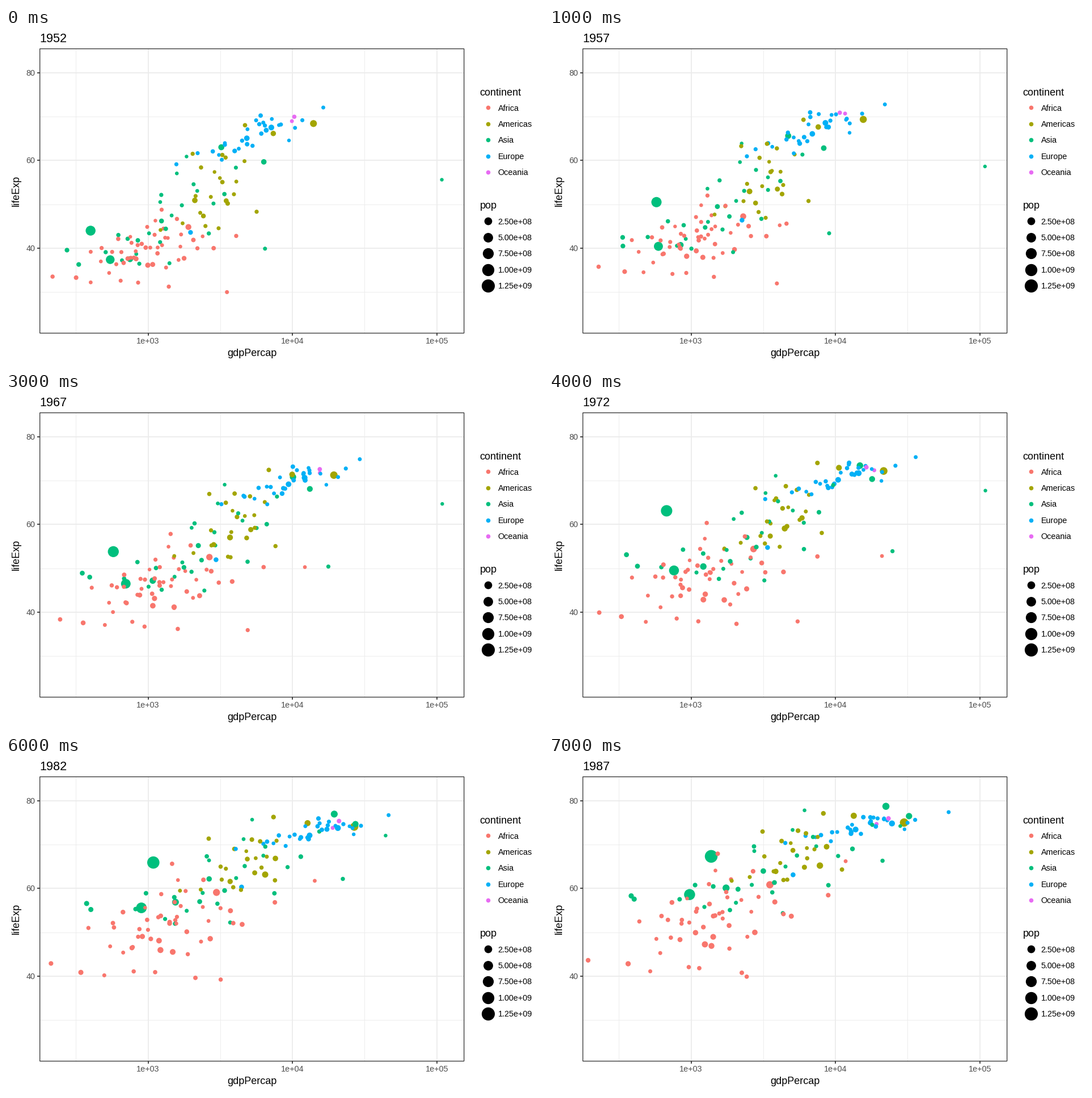
Recreate the animation shown at these times as a matplotlib script. Size 947 by 592 pixels, loop 8 s.

```python
import numpy as np
import matplotlib.pyplot as plt
from matplotlib.animation import FuncAnimation
from matplotlib.patches import Rectangle

W, H, DPI = 947, 592, 100
PX = 72 / DPI
STEPS = 8
INK, GREY, GRID = "#333333", "#4D4D4D", "#EBEBEB"
LEFT, TOP, RIGHT, BOTTOM = 59.7, 36.6, 807.7, 537.6

COLORS = {"Africa": "#F8766D", "Americas": "#A3A500", "Asia": "#00BF7D",
          "Europe": "#00B0F6", "Oceania": "#E76BF3"}

# Per continent: dots, correlation, yearly population growth, then from/to
# pairs of mean log income, its spread, mean life expectancy, its spread
CLOUDS = {
    "Africa": (49, .45, .026, (2.98, 3.13), (.25, .32), (39.5, 53), (4, 6.3)),
    "Americas": (22, .6, .021, (3.48, 3.7), (.18, .2), (54, 68), (7.5, 5)),
    "Asia": (26, .7, .021, (3.12, 3.57), (.3, .44), (47, 64.5), (7.5, 7)),
    "Europe": (28, .85, .006, (3.72, 4.19), (.22, .24), (65.5, 74), (3.7, 2)),
    "Oceania": (2, .9, .018, (4.01, 4.31), (.02, .05), (69.2, 75.3), (.2, 1)),
}

# The dots that stand out: continent, population in millions,
# and key points (step, income, life expectancy)
LEADERS = [
    ("Asia", 556, [(0, 400, 44), (1, 576, 50.5), (2, 488, 44.5),
                   (4, 677, 63.1), (7, 1379, 67.3)]),
    ("Asia", 372, [(0, 547, 37.4), (7, 977, 58.6)]),
    ("Asia", 86, [(0, 3217, 63), (4, 14779, 73.4), (7, 22376, 78.7)]),
    ("Asia", 82, [(0, 750, 37.5), (7, 1748, 60.1)]),
    ("Asia", .3, [(0, 108382, 55.6), (4, 109348, 67.7), (7, 28118, 74.2)]),
    ("Asia", 4, [(0, 6460, 39.9), (4, 24837, 53.9), (7, 21198, 66.3)]),
    ("Asia", 20, [(0, 331, 36.3), (4, 357, 53.1), (7, 385, 58.3)]),
    ("Americas", 158, [(0, 13990, 68.4), (7, 29884, 75)]),
    ("Americas", 57, [(0, 2109, 50.9), (7, 7807, 65.2)]),
    ("Americas", 30, [(0, 3478, 50.8), (7, 8688, 69.5)]),
    ("Europe", 69, [(0, 7144, 67.5), (7, 24639, 74.8)]),
    ("Europe", 22, [(0, 1969, 43.6), (7, 5089, 63.1)]),
    ("Africa", 33, [(0, 1077, 36.3), (4, 1698, 42.8), (7, 1385, 46.9)]),
    ("Africa", 4, [(0, 3521, 30), (4, 5473, 37.9), (7, 2430, 39.9)]),
    ("Africa", 1, [(0, 2388, 42.7), (4, 21011, 52.8), (7, 11770, 66.2)]),
]

rng = np.random.default_rng(11)
steps = np.arange(STEPS)
progress = steps / (STEPS - 1)


def drift(pair, power):
    """Move from the first to the second value, fast at first."""
    start, end = pair
    return start + (end - start) * progress ** power


def spread(n):
    """Evenly filled bell curve in random order."""
    p = (np.arange(n) + .5) / n
    return rng.permutation(.55 * np.log(p / (1 - p)))


def to_x(log_gdp):
    return 250.5 + (np.asarray(log_gdp) - 3) * 254.6


def to_y(life):
    return 388 - (np.asarray(life) - 40) * 7.735


def diameter(pop):
    """Dot width in pixels for a population in millions."""
    return 6.1 + 17.5 * np.sqrt(pop / 1319)


def area(width):
    return (width * PX) ** 2


def make_dot(name, log_gdp, life, pop):
    pops = pop * (1 + CLOUDS[name][2]) ** (5 * steps)
    return to_x(log_gdp), to_y(life), area(diameter(pops)), COLORS[name]


def cloud_dots(name):
    n, rho, _, gdp, gdp_sd, life, life_sd = CLOUDS[name]
    u = spread(n)
    v = rho * u + np.sqrt(1 - rho ** 2) * spread(n)
    pops = 5 * np.exp(1.1 * spread(n))
    for a, b, pop in zip(u, v, pops):
        log_gdp = drift(gdp, .7) + a * drift(gdp_sd, 1)
        years = drift(life, .9) + b * drift(life_sd, 1)
        yield make_dot(name, log_gdp + rng.normal(0, .025, STEPS),
                       years + rng.normal(0, .3, STEPS), pop)


def leader_dot(name, pop, points):
    at, gdp, life = np.transpose(points)
    return make_dot(name, np.interp(steps, at, np.log10(gdp)),
                    np.interp(steps, at, life), pop)


plt.rcParams["font.family"] = "Liberation Sans"
fig = plt.figure(figsize=(W / DPI, H / DPI), dpi=DPI, facecolor="white")
ax = fig.add_axes([0, 0, 1, 1])
ax.set_xlim(0, W)
ax.set_ylim(H, 0)
ax.axis("off")


def label(x, y, text, size, color="black", **kw):
    return ax.text(x, y, text, fontsize=size * PX, color=color, **kw)


def line(xs, ys, color, width, z):
    ax.plot(xs, ys, color=color, lw=width * PX, zorder=z,
            solid_capstyle="butt")


def draw_panel():
    for x in to_x([2.5, 3.5, 4.5]):
        line([x, x], [TOP, BOTTOM], GRID, .9, 1)
    for y in to_y([30, 50, 70]):
        line([LEFT, RIGHT], [y, y], GRID, .9, 1)
    for power in (3, 4, 5):
        x = to_x(power)
        line([x, x], [TOP, BOTTOM], GRID, 1.75, 1)
        line([x, x], [BOTTOM, BOTTOM + 4.5], INK, 1.75, 4)
        label(x, 556.5, f"1e+0{power}", 14.4, GREY, ha="center")
    for life in (40, 60, 80):
        y = to_y(life)
        line([LEFT, RIGHT], [y, y], GRID, 1.75, 1)
        line([LEFT - 4.5, LEFT], [y, y], INK, 1.75, 4)
        label(51, y + 5.2, str(life), 14.4, GREY, ha="right")
    ax.add_patch(Rectangle((LEFT, TOP), RIGHT - LEFT, BOTTOM - TOP,
                           fill=False, ec=INK, lw=1.3 * PX, zorder=5,
                           snap=False))
    label(433.5, 578.3, "gdpPercap", 18, ha="center")
    label(22.8, 287, "lifeExp", 18, rotation=90, ha="center",
          va="baseline", rotation_mode="anchor")


def draw_legend():
    label(835.5, 119, "continent", 18)
    label(835.5, 318.5, "pop", 18)
    for i, (name, color) in enumerate(COLORS.items()):
        pop = 250 * (i + 1)
        for y, width, fill, text in (
                (140.3, 7.6, color, name),
                (340.3, diameter(pop), "black", f"{pop * 1e6:.2e}")):
            y += 28.43 * i
            ax.scatter([849.9], [y], s=area(width), color=fill, lw=0)
            label(867.6, y + 5.2, text, 14.4)


draw_panel()
draw_legend()
title = label(59.5, 25.3, "1952", 21.6)

dots = [dot for name in CLOUDS for dot in cloud_dots(name)]
dots += [leader_dot(*leader) for leader in LEADERS]
dots = [dots[i] for i in rng.permutation(len(dots))]
dots.sort(key=lambda dot: dot[2][0] < area(10))  # large dots lie below
xs, ys, areas = (np.array([dot[k] for dot in dots]) for k in range(3))
cloud = ax.scatter(xs[:, 0], ys[:, 0], s=areas[:, 0],
                   c=[dot[3] for dot in dots], lw=0, zorder=3)


def update(i):
    title.set_text(str(1952 + 5 * i))
    cloud.set_offsets(np.column_stack([xs[:, i], ys[:, i]]))
    cloud.set_sizes(areas[:, i])
    return cloud, title


anim = FuncAnimation(fig, update, frames=STEPS, interval=1000, repeat=True)
plt.show()
```
